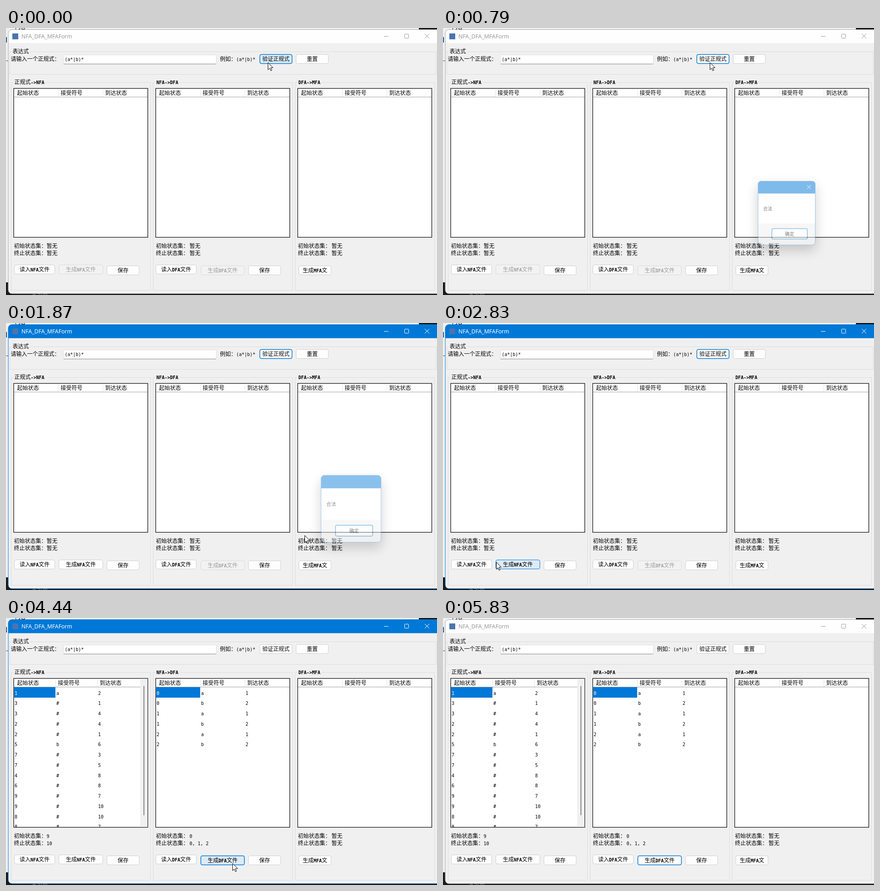
Animation, 950 px wide and 590 px high, one loop 5.9 s. Source, as an HTML page:

```html
<!DOCTYPE html>
<html lang="zh">
<head>
<meta charset="utf-8">
<title>NFA / DFA</title>
<style>
html, body { margin: 0; width: 100%; height: 100%; overflow: hidden; background: #1b1b1d; }
svg { display: block; }
text { font: 12px "Noto Sans CJK SC", "Noto Sans CJK", sans-serif; fill: #000; }
.latin { font: 10px "DejaVu Sans Mono", monospace; }
.caps { font-weight: bold; }
.mid { text-anchor: middle; }
.title { font: 12.2px "Noto Sans", sans-serif; }
.small { font-size: 11px; }
.picked text { fill: #fff; }
.btn rect { fill: #fdfdfd; stroke: #d0d0d0; }
.btn.focus rect { stroke: #0078d4; stroke-width: 1.5; }
.btn.hover rect { fill: #dcebf7; stroke: #0078d4; }
.btn.down rect { fill: #cce4f7; stroke: #005499; }
.btn.off rect { fill: #f2f2f2; stroke: #dadada; }
.btn.off text { fill: #a0a0a0; }
#bar { fill: #fefefe; }
#edge { fill: none; stroke: #a8a8a8; }
#win .title { fill: #999; }
#controls { fill: none; stroke: #999; }
.active #bar { fill: #0078d7; }
.active #edge { stroke: #0078d7; }
#win.active .title { fill: #fff; }
.active #controls { stroke: #fff; }
#shade { filter: drop-shadow(0 12px 14px rgba(0, 0, 0, .38)); }
</style>
</head>
<body>
<svg id="stage" width="950" height="590" viewBox="0 0 950 590"></svg>
<script>
const LOOP = 5900, STEP = 78, PITCH = 313;
const $ = id => document.getElementById(id);

// ---- drawing helpers ----
const runs = s => s.replace(/[\x20-\x7e]+/g, run =>
  `<tspan class="latin ${/[A-Z]/.test(run) ? 'caps' : ''}">${run.replace(/>/g, '&gt;')}</tspan>`);
const label = (x, y, s, cls = '') => `<text x="${x - .5}" y="${y + 4.3}" class="${cls}">${runs(s)}</text>`;
const box = (x, y, w, h, attrs) => `<rect x="${x}" y="${y}" width="${w}" height="${h}" ${attrs}/>`;
const path = (d, attrs) => `<path d="${d}" ${attrs}/>`;
const cross = (x, y, r) => `M${x - r} ${y - r}l${2 * r} ${2 * r}m0 ${-2 * r}l${-2 * r} ${2 * r}`;

const buttons = {};
function button(id, x, y, w, s, h = 21, cls = '') {
  buttons[id] = { x, y, w, h };
  return `<g class="btn" id="${id}">${box(x + .5, y + .5, w - 1, h - 1, 'rx="3.5"')}
    ${label(x + w / 2 + .5, y + h / 2, s, 'mid ' + cls)}</g>`;
}

const group = (x, y, w, h, s, textX, textW) =>
  box(x + .5, y + .5, w, h, 'fill="none" stroke="#dcdcdc"') +
  box(textX - 2, y - 1, textW + 4, 3, 'fill="#f0f0f0"') + label(textX, y, s);

const header = (x, colW) => ['起始状态', '接受符号', '到达状态'].map((s, i) =>
  label(x + i * colW + (i ? 6 : 8), 144, s) +
  (i ? path(`M${x + i * colW + .5} 136V152`, 'stroke="#e5e5e5"') : '')).join('');

const rows = (x, colW, data) => box(x + 1, 153, colW - 1, 23, 'fill="#0078d7"') +
  data.split(' ').map((row, r) => [row[0], row[1], row.slice(2)].map((s, c) =>
    `<g class="${r + c ? '' : 'picked'}">${label(x + 2.5 + c * colW, 165.3 + r * 22.75, s)}</g>`
  ).join('')).join('');

const status = (x, initial, final) => label(x, 482, initial) + label(x, 498, final);

function panel(i, title, name, inner, sets, extra) {
  const x = 17 + i * PITCH, valueX = x + (i ? 75 : 73);
  return group(x - 6, 120, 307, 459, title, x + 2, i ? 48 : 66) +
    box(x, 133.5, 295.5, 329, 'fill="#fff" stroke="#111" stroke-width="1.3"') +
    path(`M${x + 1} 152.5h294`, 'stroke="#a0a0a0"') +
    `<svg x="${x + 1}" y="134" width="294" height="328" viewBox="${x + 1} 134 294 328">${inner(x)}</svg>` +
    status(x + 1, '初始状态集：', '终止状态集：') +
    `<g id="${name}None">${status(valueX, '暂无', '暂无')}</g>` +
    `<g id="${name}Sets">${status(valueX, ...sets)}</g>` + extra(x);
}

// ---- scene ----
const backdrop = box(0, 0, 950, 590, 'fill="#1b1b1d"') + box(0, 0, 910, 562, 'fill="#f0f0f0"') +
  box(0, 20, 2, 12, 'fill="#2b579a"') + path('M0 72.5H5', 'stroke="#444"') +
  '<text x="20" y="2">内容</text><text x="44" y="597" style="fill:#999">一个引用</text>';

const outline = 'M960 3.5H13a8 8 0 0 0-8 8';
const frame = path(outline + 'V579a8 8 0 0 0 8 8H960Z', 'fill="#f0f0f0"') +
  path(outline + 'V33.5H960Z', 'id="bar"') +
  path(outline + 'V579a8 8 0 0 0 8 8H960', 'id="edge"') +
  box(14, 12, 13, 13, 'fill="#4a74b0"') +
  '<text class="title" x="34" y="23">NFA_DFA_MFAForm</text><g id="controls">' +
  path('M833 18.5h10' + cross(928, 18, 5)) + box(878.5, 13.5, 9, 9, 'rx="1"') + '</g>';

const form = group(8, 52, 940, 50, '表达式', 15, 36) +
  label(11, 69, '请输入一个正规式：') +
  box(126.5, 59.5, 337, 20, 'rx="2" fill="#fff" stroke="#dedede"') +
  path('M127 79.5H463', 'stroke="#868686"') + label(130, 69, '(a*|b)*') +
  label(472, 69, '例如：(a*|b)*') +
  button('verify', 559, 58, 72, '验证正规式') + button('reset', 639, 58, 72, '重置');

const nfa = panel(0, '正规式->NFA', 'nfa', x => `<g id="nfaEmpty">${header(x, 98)}</g>
  <g id="nfaRows">${header(x, 92)}
    ${rows(x, 92, '1a2 3#1 3#4 2#4 2#1 5b6 7#3 7#5 4#8 6#8 9#7 9#10 8#10 8#7')}
    ${box(296, 134, 16, 328, 'fill="#f0f0f0"')}
    ${path('M304 151V435', 'stroke="#858585" stroke-width="2" stroke-linecap="round"')}</g>`,
  ['9', '10'], x => button('loadNfa', x + 1, 523, 90, '读入NFA文件') +
    button('makeNfa', x + 99, 523, 98, '生成NFA文件') + button('saveNfa', x + 205, 525, 72, '保存'));

const dfa = panel(1, 'NFA->DFA', 'dfa', x => header(x, 98) +
  `<g id="dfaRows">${rows(x, 98, '0a1 0b2 1a1 1b2 2a1 2b2')}</g>`,
  ['0', '0, 1, 2'], x => button('loadDfa', x, 523, 90, '读入DFA文件') +
    button('makeDfa', x + 99, 525, 97, '生成DFA文件') + button('saveDfa', x + 204, 525, 72, '保存'));

const mfa = panel(2, 'DFA->MFA', 'mfa', x => header(x, 98), ['', ''],
  x => button('makeMfa', x + 2, 525, 72, '生成MFA文'));

const dialog = `<g id="dialog"><g id="shade">${box(694, 335, 138, 154, 'rx="8" fill="#f0f0f0"')}</g>
  ${box(695, 360, 136, 77, 'fill="#fff"')}
  ${path('M694 365V343a8 8 0 0 1 8-8H824a8 8 0 0 1 8 8V365Z', 'fill="#0078d7"')}
  ${box(694.5, 335.5, 137, 153, 'rx="7.5" fill="none" stroke="#2b8cdc"')}
  ${path(cross(816.5, 349.5, 4.7), 'id="dialogX" stroke="#fff"')}
  ${label(707, 401, '合法', 'small')}
  ${button('ok', 727, 449, 86, '确定', 26, 'small')}</g>`;

const cursor = path('M.5 .5V16.2L4.1 12.8L6.6 18.4L9 17.4L6.6 11.8H11.6Z',
  'id="cursor" fill="#fff" stroke="#000"');

$('stage').innerHTML = backdrop + `<g id="win">${frame}${form}${nfa}${dfa}${mfa}</g>` + dialog + cursor;

// ---- timing ----
// The picture changes in bursts of even steps: start, number of steps
const bursts = [[290, 3], [620, 8], [1240, 8], [1870, 8], [2520, 8],
  [3210, 8], [3830, 8], [4440, 8], [5070, 5], [5830, 1]];

function snap(t) {
  const [start, count] = bursts.filter(b => b[0] <= t).pop() || [0, 1];
  return start + STEP * Math.min(count - 1, Math.floor((t - start) / STEP + .15));
}

// Pointer moves: from time, to time, x, y
const moves = [[290, 446, 588, 76], [776, 1318, 672, 485], [1318, 1552, 750, 462],
  [1708, 1870, 658, 469], [1870, 2416, 68, 521], [2520, 2832, 117, 528],
  [3830, 4064, 300, 469], [4064, 4298, 492, 552], [4298, 4376, 499, 542],
  [4440, 4986, 563, 549], [5070, 5382, 830, 600]];

const press = { verify: 620, ok: 1700, makeNfa: 3210, makeDfa: 4370 };
const released = (id, t) => t >= press[id] + 70;
const ramp = (t, a, b) => Math.min(1, Math.max(0, (t - a) / (b - a)));

function pointer(t) {
  let x = 577, y = 76;
  for (const [a, b, toX, toY] of moves) {
    const p = ramp(t, a, b), k = p * p * (3 - 2 * p);
    x += (toX - x) * k;
    y += (toY - y) * k;
  }
  return [Math.round(x), Math.round(y)];
}

const show = (id, on) => { $(id).style.display = on ? '' : 'none'; };

function draw(now) {
  const t = snap(now % LOOP);
  const [px, py] = pointer(t);
  const closing = released('ok', t), modal = released('verify', t) && !closing;
  const nfaDone = released('makeNfa', t), dfaDone = released('makeDfa', t);
  const off = { makeNfa: !closing, makeDfa: !nfaDone };
  const focus = ['makeDfa', 'makeNfa'].find(id => t >= press[id]) || 'verify';

  for (const [id, b] of Object.entries(buttons)) {
    const over = px >= b.x && px < b.x + b.w && py >= b.y && py < b.y + b.h;
    const flags = {
      off: off[id],
      focus: id === focus || id === 'ok',
      hover: over && !off[id] && modal === (id === 'ok'),
      down: t >= press[id] && !released(id, t)
    };
    $(id).setAttribute('class', 'btn ' + Object.keys(flags).filter(f => flags[f]).join(' '));
  }

  $('win').setAttribute('class', t >= press.verify && t < 5830 && !modal ? 'active' : '');
  show('nfaEmpty', !nfaDone);
  show('nfaRows', nfaDone);
  show('dfaRows', dfaDone);
  for (const [name, done] of [['nfa', nfaDone], ['dfa', dfaDone]]) {
    show(name + 'None', !done);
    show(name + 'Sets', done);
  }

  const alpha = ramp(t, 697, 855) * (1 - ramp(t, 1786, 1940));
  const scale = 1 - (closing ? .065 : .16) * (1 - alpha);
  show('dialog', alpha > 0);
  show('dialogX', !closing);
  $('dialog').setAttribute('opacity', alpha);
  $('dialog').setAttribute('transform', `translate(694 373.5) scale(${scale}) translate(-694 -373.5)`);

  show('cursor', t < 5382);
  $('cursor').setAttribute('transform', `translate(${px} ${py})`);
}

const start = performance.now();
function tick() {
  draw(performance.now() - start);
  requestAnimationFrame(tick);
}
tick();
</script>
</body>
</html>
```
